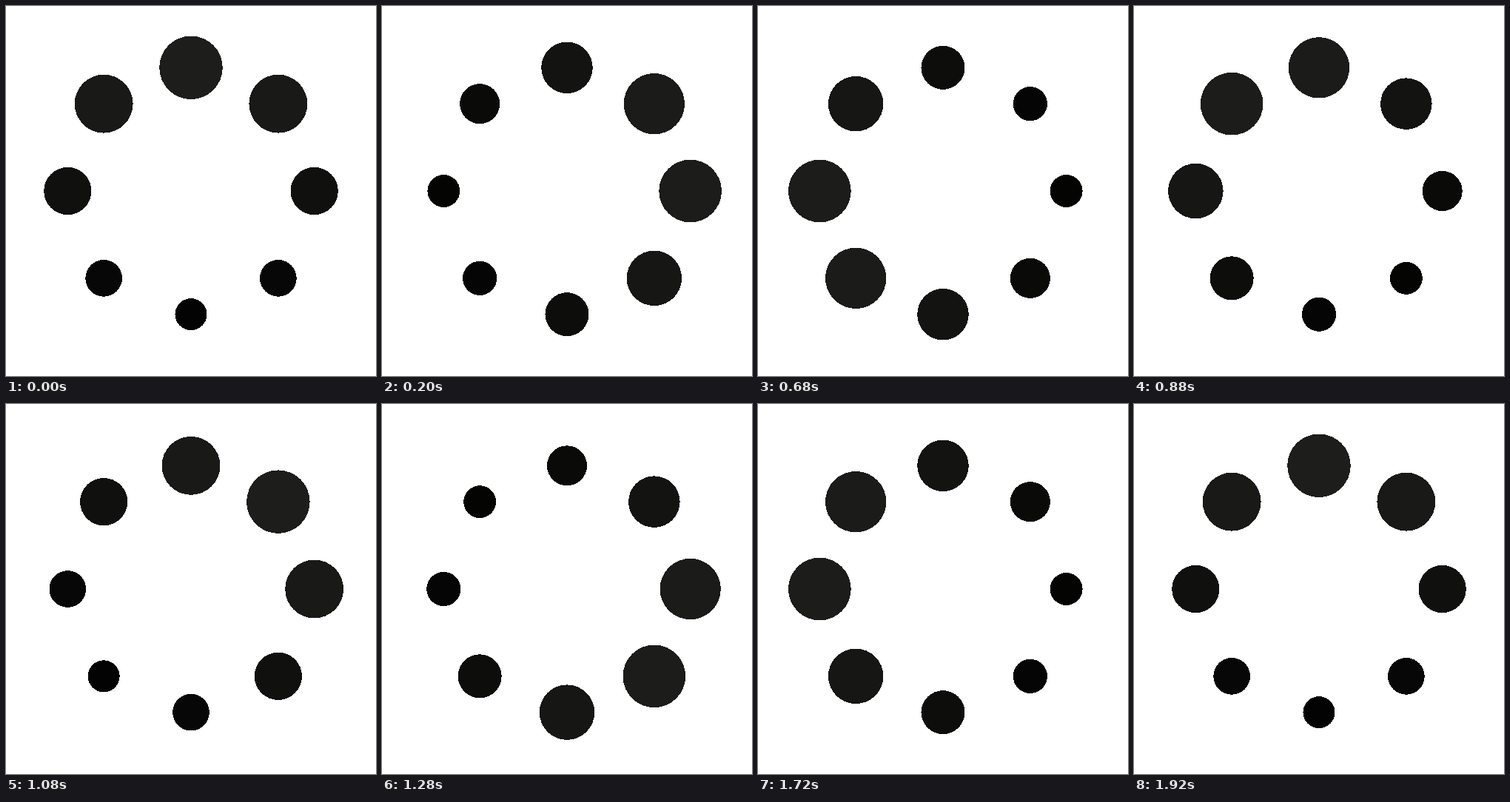
These frames come from a looping animation (500 by 500 pixels, 1.96 s). An HTML page:

```html
<!DOCTYPE html>
<html lang="en">
<head>
<meta charset="utf-8">
<title>Loader</title>
<style>
  html, body { margin: 0; width: 100%; height: 100%; overflow: hidden; background: #fff; }
  svg { display: block; width: 100%; height: 100%; }
</style>
</head>
<body>
<svg viewBox="0 0 500 500" shape-rendering="crispEdges"></svg>
<script>
const COUNT = 8, RING = 500 / 3, STEP = 40, STEPS = 49, TURN = 24;
const SMALL = 21.53, BIG = 42.77;
const DARK = [3, 3, 3], LIGHT = [29, 29, 27];
const svg = document.querySelector('svg');

const dots = Array.from({ length: COUNT }, (_, i) => {
  const angle = i / COUNT * 2 * Math.PI;
  const dot = document.createElementNS('http://www.w3.org/2000/svg', 'circle');
  dot.setAttribute('cx', 250 + RING * Math.sin(angle));
  dot.setAttribute('cy', 250 - RING * Math.cos(angle));
  return svg.appendChild(dot);
});

const smooth = p => p * p * (3 - 2 * p);
const mix = (a, b, p) => a + (b - a) * p;

function draw(time) {
  const step = Math.floor(time / STEP) % STEPS;
  dots.forEach((dot, i) => {
    // Phase is 0 when the dot is largest and 0.5 when it is smallest
    const phase = (step / TURN - i / COUNT + 1) % 1;
    const size = smooth(Math.abs(1 - 2 * phase));
    const rgb = DARK.map((c, k) => Math.round(mix(c, LIGHT[k], size)));
    dot.setAttribute('r', mix(SMALL, BIG, size));
    dot.setAttribute('fill', `rgb(${rgb})`);
  });
}

const start = performance.now();
function tick() {
  draw(performance.now() - start);
  requestAnimationFrame(tick);
}
tick();
</script>
</body>
</html>
```
